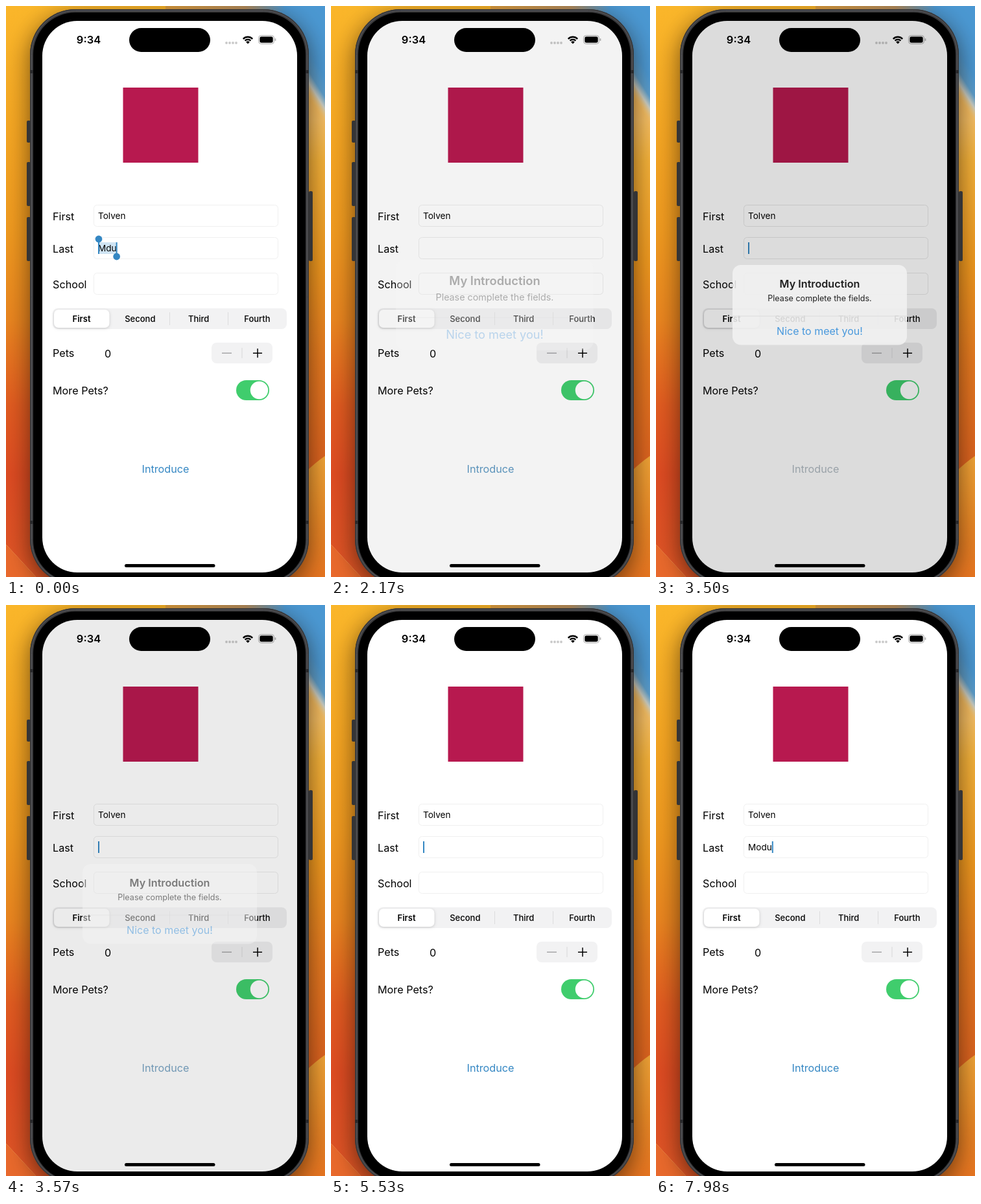
Recreate the animation shown at these times as an HTML page with a canvas. Size 492x882 px, loop 8 s.

```html
<!DOCTYPE html>
<html lang="en">
<head>
<meta charset="utf-8">
<title>Introduction form</title>
<style>
  html, body { margin: 0; width: 100%; height: 100%; overflow: hidden; background: #000; }
  canvas { display: block; width: 492px; height: 882px; }
</style>
</head>
<body>
<canvas id="stage"></canvas>
<script>
const W = 492, H = 882, LOOP = 8000, STEP = 70;
const canvas = document.getElementById('stage');
const ctx = canvas.getContext('2d');
const dpr = window.devicePixelRatio || 1;
canvas.width = W * dpr;
canvas.height = H * dpr;

const BLUE = '#3487c3';
const FIRST_NAME = 'Tolven';
// What the "Last" field holds from each time on
const EDITS = [
  [0, 'Mdu'], [700, ''], [3430, ''], [5600, 'M'], [6300, 'Md'],
  [6800, 'M'], [7050, 'Mo'], [7350, 'Mod'], [7600, 'Modu']
];
const SELECT_END = 700, PRESS = 1960, SHOW = 2100, DISMISS = 3460;

function box(x, y, w, h, r, fill, stroke, line = 1) {
  ctx.beginPath();
  ctx.roundRect(x, y, w, h, r);
  if (fill) { ctx.fillStyle = fill; ctx.fill(); }
  if (stroke) { ctx.strokeStyle = stroke; ctx.lineWidth = line; ctx.stroke(); }
}

function rect(x, y, w, h, fill) {
  ctx.fillStyle = fill;
  ctx.fillRect(x, y, w, h);
}

function disc(x, y, r, fill) {
  ctx.beginPath();
  ctx.arc(x, y, r, 0, Math.PI * 2);
  ctx.fillStyle = fill;
  ctx.fill();
}

function shadowBox(x, y, w, h, r, fill, color, blur, drop) {
  ctx.save();
  ctx.shadowColor = color;
  ctx.shadowBlur = blur * dpr;
  ctx.shadowOffsetY = drop * dpr;
  box(x, y, w, h, r, fill);
  ctx.restore();
}

function text(str, x, y, size, { color = '#000', weight = 400, align = 'left' } = {}) {
  ctx.font = `${weight} ${size}px Inter, sans-serif`;
  ctx.textAlign = align;
  ctx.fillStyle = color;
  ctx.fillText(str, x, y);
}

function gradient(x0, y0, x1, y1, ...stops) {
  const g = ctx.createLinearGradient(x0, y0, x1, y1);
  stops.forEach(([at, color]) => g.addColorStop(at, color));
  return g;
}

function mix(a, b, p) {
  return `rgb(${a.map((v, i) => Math.round(v + (b[i] - v) * p))})`;
}

// Critically damped spring from 0 to 1
function spring(ms, rate = 15.6) {
  const k = Math.max(0, ms) / 1000 * rate;
  return 1 - (1 + k) * Math.exp(-k);
}

function wallpaper() {
  rect(0, 0, W / 2, H, gradient(40, 0, 0, H,
    [0, '#fab62a'], [0.2, '#f5a723'], [0.4, '#ee981f'], [0.55, '#e8841f'],
    [0.7, '#e05a20'], [0.82, '#dc4a22'], [1, '#de5526']));
  ctx.beginPath();
  ctx.moveTo(0, 832);
  ctx.lineTo(46, H);
  ctx.strokeStyle = '#f39a55';
  ctx.lineWidth = 1;
  ctx.stroke();
  ctx.lineTo(0, H);
  ctx.fillStyle = '#e8682c';
  ctx.fill();

  rect(W / 2, 0, W / 2, H, gradient(0, 0, 0, H,
    [0, '#f0b050'], [0.2, '#f4bd62'], [0.27, '#f3b13a'], [0.45, '#ee981f'],
    [0.62, '#e57920'], [0.8, '#dc621f'], [1, '#dc621f']));
  // Blue corner with a pale, slanted edge
  rect(W / 2, 0, W / 2, 220, gradient(492, 110, 452, 135,
    [0, '#4a97d2'], [0.35, '#5b9dcb'], [0.55, '#c9cdc4'], [0.8, 'rgba(244,196,112,0)']));
  rect(W / 2, 0, W / 2, 8, gradient(W / 2, 0, W, 0,
    [0, '#e0a040'], [0.5, '#b89060'], [0.75, '#4a97d2'], [1, '#4a97d2']));

  ctx.beginPath();
  ctx.moveTo(460, 722);
  ctx.quadraticCurveTo(476, 706, W, 695);
  ctx.lineTo(W, H);
  ctx.lineTo(440, H);
  ctx.fillStyle = gradient(0, 695, 0, H, [0, '#f0a437'], [0.5, '#ea8a27'], [1, '#e47320']);
  ctx.fill();
}

function phone() {
  shadowBox(37, 5, 430, 889, 70, '#39393b', 'rgba(25,12,0,.6)', 36, 10);
  for (const [x, y, h] of [[32, 177, 34], [32, 241, 68], [32, 326, 68], [467, 286, 108]]) {
    box(x, y, 6, h, 2, '#343436');
  }
  box(37, 5, 430, 889, 70, '#39393b');
  box(39.5, 7.5, 425, 884, 67, null, '#5c5c60');
  for (const y of [99, 795]) {
    rect(37, y, 5, 5, '#29292b');
    rect(462, y, 5, 5, '#29292b');
  }
  box(42, 10, 420, 880, 65, '#000');
}

function statusBar() {
  text('9:34', 127.5, 58, 16.5, { weight: 600, align: 'center' });
  for (let i = 0; i < 4; i++) disc(340 + i * 5, 57, 1.9, '#c9c9c9');

  ctx.strokeStyle = '#000';
  ctx.lineWidth = 2.5;
  for (const r of [6.2, 10.2]) {
    ctx.beginPath();
    ctx.arc(373, 58, r, -Math.PI * 0.75, -Math.PI * 0.25);
    ctx.stroke();
  }
  ctx.beginPath();
  ctx.moveTo(373, 58.5);
  ctx.arc(373, 58.5, 4, -Math.PI * 0.75, -Math.PI * 0.25);
  ctx.fillStyle = '#000';
  ctx.fill();

  box(389.5, 45.5, 24, 13, 4, null, '#a8a8a8');
  box(391.3, 47.3, 20.4, 9.4, 2.6, '#000');
  box(414.8, 50, 1.5, 4, 1, '#a8a8a8');
}

function lastField(t) {
  const [since, value] = EDITS.filter(e => e[0] <= t).pop();
  const x = 142, y = 365, h = 18;
  ctx.font = '400 13.6px Inter, sans-serif';
  const end = x + ctx.measureText(value).width;
  const selected = t < SELECT_END;
  if (selected) rect(x, y, end - x, h, '#cfe4f3');
  text(value, x, 379, 13.6);
  if (selected) {
    rect(x, y - 1, 2, h + 1, BLUE);
    rect(end - 1, y, 2, h + 1, BLUE);
    disc(x + 1, 360, 5.4, BLUE);
    disc(end, 387, 5.4, BLUE);
  } else if ((t < SHOW || t >= 3430) && (t - since) % 1000 < 600) {
    rect(value ? end : x, y, 2, h, BLUE);
  }
}

function form(t, dim) {
  box(180.5, 126, 116, 116, 0, '#b7194f');

  [['First', 324], ['Last', 374], ['School', 429]].forEach(([label, y]) => {
    text(label, 72, y + 6.5, 16.2);
    box(135.5, y - 16.5, 284, 33, 5, null, mix([240, 240, 240], [228, 228, 228], dim));
  });
  text(FIRST_NAME, 142, 329, 13.6);
  lastField(t);

  const panel = mix([242, 242, 243], [234, 234, 235], dim);
  box(72, 467, 361, 32, 8, panel);
  shadowBox(74, 469, 85.5, 28, 7, '#fff', 'rgba(0,0,0,.18)', 4, 1);
  rect(252, 473, 1, 20, '#dcdcdd');
  rect(342, 473, 1, 20, '#dcdcdd');
  ['First', 'Second', 'Third', 'Fourth'].forEach((label, i) =>
    text(label, 116.5 + i * 90.3, 487.6, 13, { weight: i ? 500 : 600, align: 'center' }));

  text('Pets', 72, 542, 16.2);
  text('0', 157, 542.5, 16.2, { align: 'center' });
  box(317, 520, 94, 32, 8, panel);
  rect(333, 535.5, 15, 1.4, '#a0a0a2');
  rect(363.5, 528, 1, 16, '#d6d6d8');
  rect(381, 535.5, 14, 1.5, '#000');
  rect(387.3, 529.2, 1.5, 14, '#000');

  text('More Pets?', 72, 599.5, 16.2);
  box(355, 578, 51, 31, 15.5, '#40cd6d');
  disc(390.5, 593.5, 13.7, '#fff');

  ctx.globalAlpha = t >= PRESS && t < SHOW ? 0.3 : 1;
  text('Introduce', 246, 721, 16.2, {
    color: mix([52, 135, 195], [194, 194, 194], dim), align: 'center'
  });
  ctx.globalAlpha = 1;
}

function alertBox(alpha, scale) {
  ctx.save();
  ctx.globalAlpha = alpha;
  ctx.translate(252.5, 461.5);
  ctx.scale(scale, scale);
  box(-134.5, -61.5, 269, 123.5, 13, '#f3f3f3');
  text('My Introduction', 0, -26.7, 16.2, { weight: 600, align: 'center' });
  text('Please complete the fields.', 0, -6, 12.6, { align: 'center' });
  rect(-134.5, 17, 269, 1, '#d8d8d8');
  text('Nice to meet you!', 0, 46.5, 16, { color: '#2f8bd9', align: 'center' });
  ctx.restore();
}

function draw(t) {
  ctx.setTransform(dpr, 0, 0, dpr, 0, 0);
  wallpaper();
  phone();

  const shown = spring(t - SHOW);
  const alpha = shown * (1 - spring(t - DISMISS));
  ctx.save();
  ctx.beginPath();
  ctx.roundRect(56, 23, 393, 852, 54);
  ctx.clip();
  rect(56, 23, 393, 852, '#fff');
  statusBar();
  form(t, alpha);
  rect(56, 23, 393, 852, `rgba(0,0,0,${0.157 * alpha})`);
  if (alpha > 0.004) alertBox(alpha, 1.19 - 0.19 * shown);
  ctx.restore();

  box(190, 34, 125, 37, 18.5, '#000');
  box(183, 862, 139.5, 5, 2.5, '#000');
}

const start = performance.now();
function tick() {
  const t = (performance.now() - start) % LOOP;
  draw(Math.floor(t / STEP) * STEP);
  requestAnimationFrame(tick);
}
tick();
</script>
</body>
</html>
```
